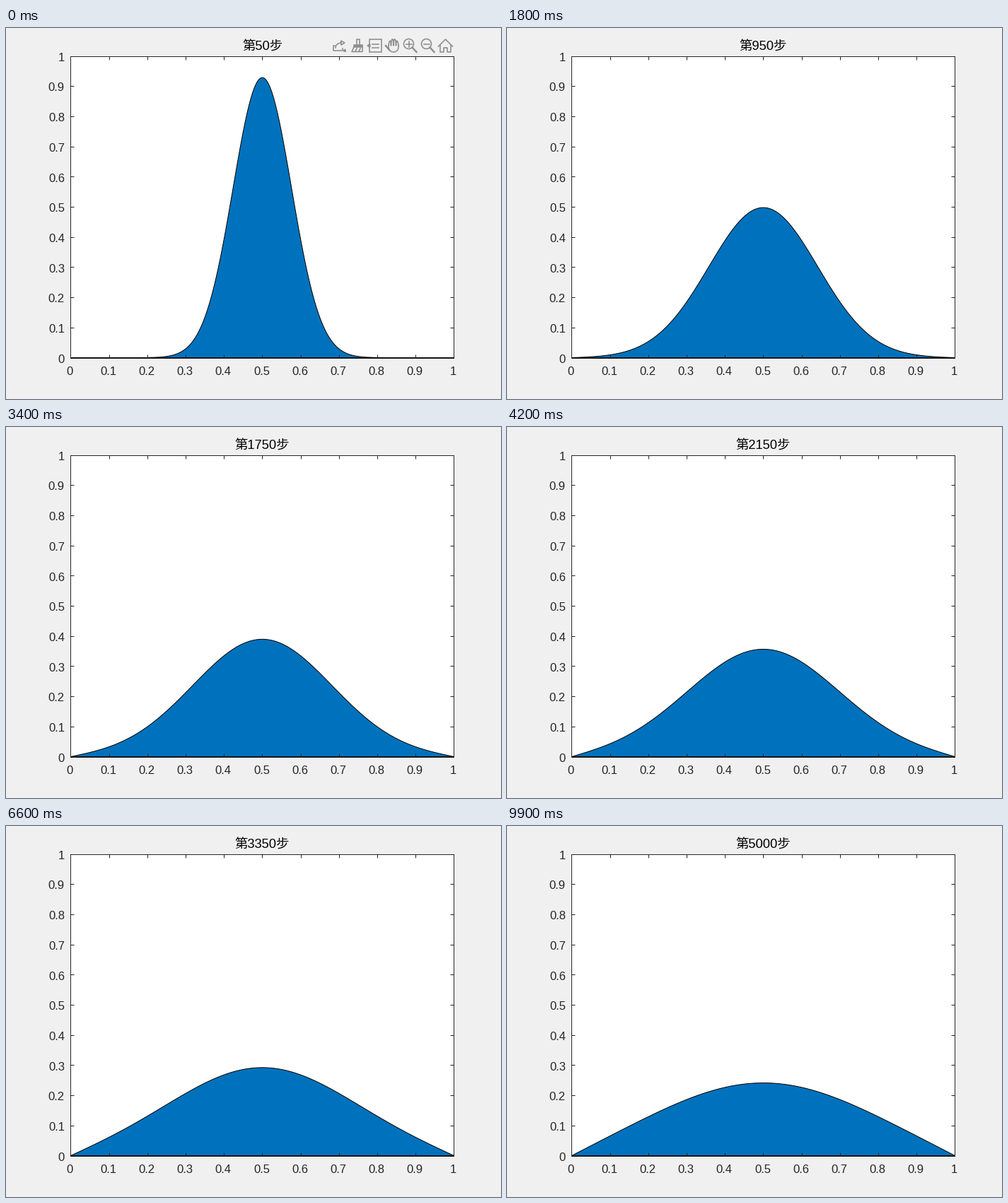
Animation of 700x525 px, one loop 10000 ms. Source, as a matplotlib script:

```python
import matplotlib.pyplot as plt
import numpy as np
from matplotlib.animation import FuncAnimation
from matplotlib.patches import Circle, Rectangle, RegularPolygon

W, H, DPI = 700, 525, 100
# Just short of half pixels, so lines and ticks snap to the same pixel
LEFT, RIGHT, TOP, BOTTOM = 91.45, 633.45, 39.55, 466.55
PX = 72 / DPI  # one pixel in points
FRAMES, STEPS = 100, 50
BLUE, INK, GRAY = "#0072bd", "#262626", "#8e8e8e"

plt.rcParams["font.family"] = ["Liberation Sans", "Noto Sans CJK JP"]
fig = plt.figure(figsize=(W / DPI, H / DPI), dpi=DPI, facecolor="#f0f0f0")

ax = fig.add_axes([LEFT / W, 1 - BOTTOM / H, (RIGHT - LEFT) / W, (BOTTOM - TOP) / H])
ax.set(xlim=(0, 1), ylim=(0, 1), facecolor="white", axisbelow=False)
ticks = np.arange(11) / 10
ax.set_xticks(ticks)
ax.set_yticks(ticks)
ax.tick_params(direction="in", top=True, right=True, length=5.4 * PX, width=PX,
               color=INK, labelbottom=False, labelleft=False)
for spine in ax.spines.values():
    spine.set(linewidth=PX, edgecolor=INK)

# Overlay in stage pixels, y pointing down
ui = fig.add_axes([0, 0, 1, 1])
ui.set(xlim=(0, W), ylim=(H, 0))
ui.axis("off")


def label(x, y, text, size, ha="center", color=INK):
    return ui.text(x, y, text, fontsize=size * PX, ha=ha, va="baseline", color=color)


for v in ticks:
    label(LEFT - 1 + v * (RIGHT - LEFT), 491, f"{v:g}", 16.67)
    label(83, BOTTOM + 7.2 - v * (BOTTOM - TOP), f"{v:g}", 16.67, ha="right")
title = label(362.5, 32, "", 18.33, color="black")

toolbar = []


def curve(x, y, w=1.6):
    toolbar.extend(ui.plot(x, y, color=GRAY, lw=w * PX))


def shape(patch, fill=False):
    patch.set(fill=fill, color=GRAY, lw=1.6 * PX)
    toolbar.append(ui.add_patch(patch))


def box(x, y, w, h, fill=False):
    shape(Rectangle((x, y), w, h), fill)


def export_icon(x, y):
    curve([x - 6, x - 8, x - 8, x + 5, x + 5], [y, y, y + 7, y + 7, y + 4])
    a = np.linspace(np.pi, 1.5 * np.pi, 12)
    curve(x + 3 + 8 * np.cos(a), y + 3 + 7 * np.sin(a))
    shape(RegularPolygon((x + 4.5, y - 4), 3, radius=3.5, orientation=-np.pi / 2))
    shape(RegularPolygon((x + 8, y + 7), 3, radius=2, orientation=-np.pi / 4), True)


def brush_icon(x, y):
    box(x - 1.5, y - 9, 4, 9)
    box(x - 5, y - 1, 12, 3, fill=True)
    curve([x - 5, x - 8, x + 7, x + 7], [y + 2, y + 8.5, y + 8.5, y + 2])
    for dx in (-2, 3):
        curve([x + dx - 1, x + dx + 1], [y + 8, y + 4])


def tip_icon(x, y):
    box(x - 8, y - 9, 17, 18)
    shape(RegularPolygon((x - 8.5, y), 3, radius=2.5, orientation=np.pi / 2), True)
    for dy in (-2.5, 2.5):
        curve([x - 4, x + 5], [y + dy, y + dy])


def hand_icon(x, y):
    t = np.linspace(0, 4, 81)
    fingers = (9.5 - 1.3 * (t - 2) ** 2) * np.abs(np.sin(np.pi * t)) ** 0.4
    curve(x - 5 + 3.5 * t, y - fingers)
    a = np.linspace(0, np.pi, 30)
    curve(x + 2 + 7 * np.cos(a), y + 9 * np.sin(a) ** 0.7)
    curve([x - 9, x - 4], [y, y + 6], w=2.4)


def lens_icon(x, y, plus=False):
    x, y = x - 2, y - 2.5
    shape(Circle((x, y), 7))
    curve([x + 5, x + 11], [y + 5, y + 11.5], w=2.4)
    curve([x - 4, x + 4], [y, y])
    if plus:
        curve([x, x], [y - 4, y + 4])


def home_icon(x, y):
    curve([x - 10, x, x + 10], [y + 1, y - 9, y + 1])
    for side in (-1, 1):
        curve(x + side * np.array([7.5, 7.5, 2.5, 2.5, 0]),
              y + np.array([-1, 9, 9, 3, 3]))


export_icon(471, 25)
brush_icon(497, 25)
tip_icon(522, 25)
hand_icon(546, 25)
lens_icon(571.5, 25, plus=True)
lens_icon(596.5, 25)
home_icon(621.5, 25)

x = np.linspace(0, 1, 201)
area, = ax.fill(x, 0 * x, fc=BLUE, ec="black", lw=PX, zorder=1, clip_on=False)


def diffuse(n):
    """Spreading bell with both ends held at zero, by mirror images."""
    s = 1 + 0.0032 * n
    bell = lambda d: np.exp(-100 * d**2 / s) / np.sqrt(s)
    return sum(bell(x - 0.5 - 2 * k) - bell(x + 0.5 - 2 * k) for k in range(-2, 3))


def update(i):
    n = STEPS * (i + 1)
    area.set_xy(np.column_stack([x, diffuse(n)]))
    title.set_text(f"第{n}步")
    for item in toolbar:
        item.set_visible(i == 0)


anim = FuncAnimation(fig, update, frames=FRAMES, interval=100, repeat=True,
                     repeat_delay=0, init_func=lambda: update(0))
plt.show()
```
